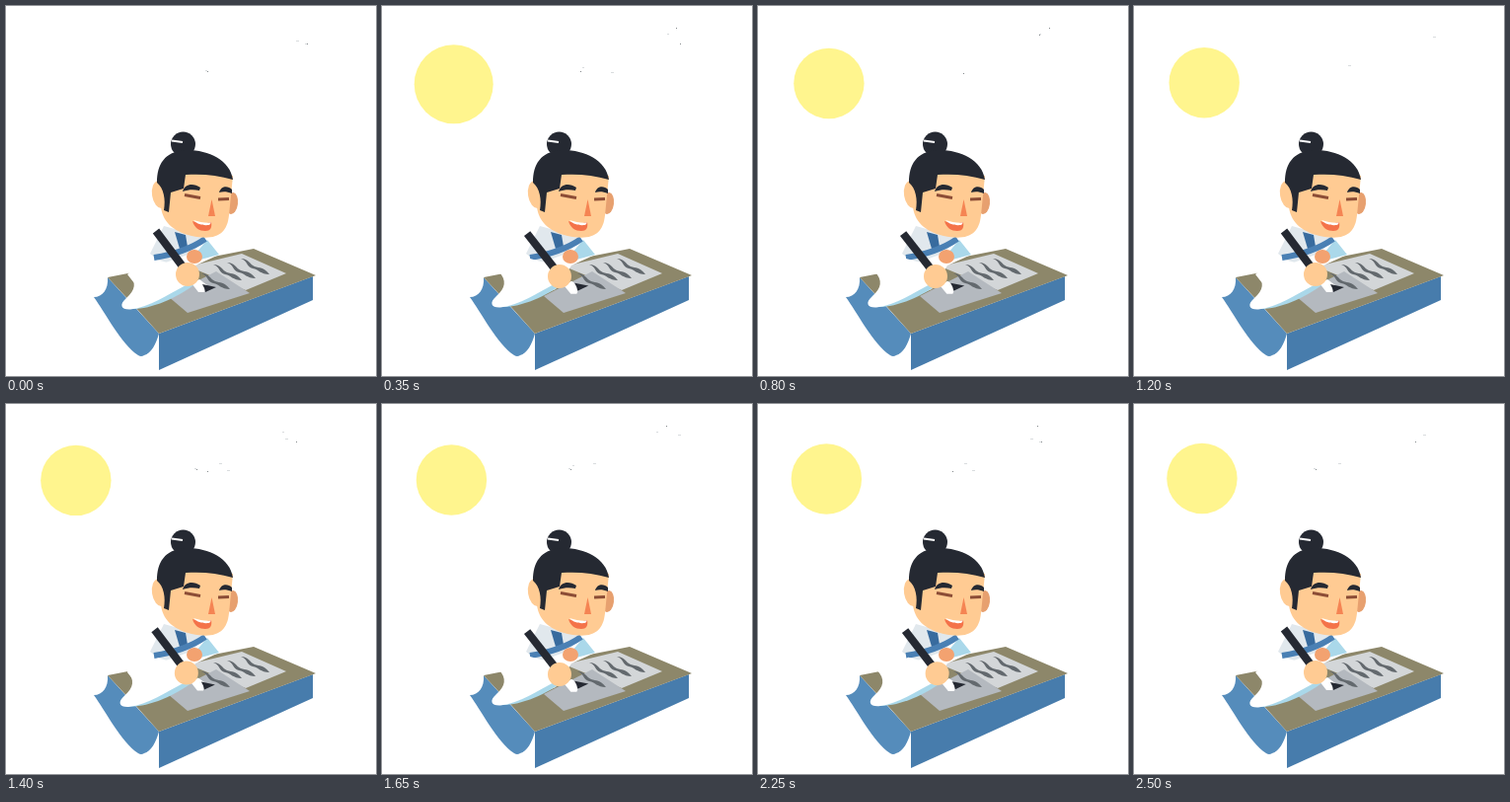
An HTML page with a canvas for the animation above (2550 ms loop, 375 px wide and 375 px high).

```html
<!DOCTYPE html>
<html lang="en">
<head>
<meta charset="utf-8">
<title>Calligrapher</title>
<style>
html, body { margin: 0; width: 100%; height: 100%; overflow: hidden; background: #fff; }
canvas { display: block; }
</style>
</head>
<body>
<canvas id="stage" width="375" height="375"></canvas>
<script>
const ctx = document.getElementById('stage').getContext('2d');
const LOOP = 2550, STEP = 50;
const SKIN = '#ffcb93', HAIR = '#252932', BLUE = '#4a80b4', PALE = '#aad8ea';

function fill(color, d) {
  ctx.fillStyle = color;
  ctx.fill(new Path2D(d));
}
function stroke(color, width, d) {
  ctx.strokeStyle = color;
  ctx.lineWidth = width;
  ctx.stroke(new Path2D(d));
}
function oval(color, x, y, rx, ry = rx, turn = 0) {
  ctx.fillStyle = color;
  ctx.beginPath();
  ctx.ellipse(x, y, rx, ry, turn, 0, 7);
  ctx.fill();
}
const clamp = v => Math.max(0, Math.min(1, v));
const smooth = v => { v = clamp(v); return v * v * (3 - 2 * v); };
const hash = n => { const v = Math.sin(n * 127.1) * 43758.5453; return v - Math.floor(v); };

function drawSun(t) {
  const grow = 40 * Math.sin(Math.PI / 2 * clamp(t / 0.35));
  const r = grow - 4.3 * smooth((t - 0.35) / 0.2);
  if (r > 0) oval('#fff58e', 73.3 - 1.75 * t, 79.8 - 1.7 * t, r);
}

// White clouds on white: only flickering flecks of their outlines show.
function drawClouds(t, tick) {
  [[302, 30, 11, 8], [222, 64, 20, 4]].forEach(([x, y, rx, ry], c) => {
    for (let i = 0; i < 7; i++) {
      const seed = c * 20 + i;
      if (hash(seed + tick * 3.7) < 0.62) continue;
      const a = hash(seed + 5) * 6.28;
      ctx.fillStyle = i % 3 ? '#d9dcde' : '#83888b';
      ctx.fillRect(Math.round(x - 8 * t + rx * Math.cos(a)), Math.round(y + ry * Math.sin(a)), 1 + i % 3, 1);
    }
  });
}

function drawTable() {
  fill('#558cbb', 'M103 275C104 287 98 295 89 295C100 310 117 343 134 354Q137 356 140 354C147 352 152 343 155 332Z');
  fill('#477cac', 'M155 332L311 274V298L155 369Z');
  fill('#8d876a', 'M103 275L251 246L314 273L155 332L129 303Z');
  fill('#d3d6d8', 'M185 264L239 251L284 271L243 288Z');
  fill('#b4b9bf', 'M164 294L213 269L247 291L184 311Z');
  const wave = 'c8 0 9 6 14 8s9 0 15 8c-9 0-11-5-17-6s-5-8-12-10z';
  for (const start of ['M210 262', 'M224 260', 'M238 256', 'M198 271'])
    fill('#63696e', start + wave);
}

function drawBody() {
  fill('#fff', 'M123 272L151 250L165 225L200 236L216 252L192 263L176 287L145 300Z');
  fill('#e1e8ed', 'M160 223L146 251L159 261L190 250L200 234Z');
  fill(PALE, 'M192 251L204 237L216 252L197 257Z');
  fill('#386b9e', 'M171 229L182 232L184 244L176 246Z');
  stroke(BLUE, 6, 'M150 255Q182 250 202 236');
  oval('#f3a270', 191, 254, 8, 7);
}

function drawHead() {
  oval('#e7a06f', 229, 200, 6, 11, 0.12);
  oval(SKIN, 156, 191, 8, 14, -0.15);
  fill(SKIN, 'M161 174L157 204C159 218 168 228 188 233C212 238 224 232 226 212L230 172L180 158Z');
  oval(HAIR, 179.5, 140, 12.5);
  stroke('#fff', 2.2, 'M168 136.5L179 138');
  fill(HAIR, 'M153 179C153 160 161 148 181 146C203 145 227 155 230 176C214 171 198 170 182 171L180 185L167 189L165 209L160 207C162 196 160 185 153 179Z');
  fill(HAIR, 'M179 188C181 180 190 179 197 184L196 187C190 186 185 186 179 188ZM216 189C218 182 225 182 229 186L229 190C224 188 220 188 216 189Z');
  stroke('#8c4d36', 3, 'M181 191.500L197 194.500M215 196L226 195.5');
  fill('#f58453', 'M208.500 196L205 213H212Z');
  fill('#f4734a', 'M189 218C196 221 202 221 208 219C209 225 207 228 202 228C196 228 191 225 189 218Z');
  fill('#fff', 'M190 217C196 219 202 220 208 219.500L206 222C200 222.500 195 222 190 217Z');
}

// k: 0 = hand forward, 1 = hand drawn back
function drawArm(k) {
  ctx.save();
  ctx.translate(-6 * k, -2 * k);
  fill(PALE, 'M126 307C145 308 172 297 193 281L172 268Z');
  fill('#fff', 'M124 271C133 280 131 288 122 296C114 303 117 308 126 307.500C146 305 163 293 184 282L178 264L156 258Z');
  ctx.restore();

  ctx.save();
  ctx.translate(-4 * k, 2 * k);
  ctx.translate(184, 272);
  ctx.rotate(-0.02 * k);
  ctx.translate(-184, -272);
  stroke(HAIR, 8, 'M152 228L182 268');
  fill('#fff', 'M188 281L196 277L204 283L201 290L195 290Z');
  oval(SKIN, 184, 272, 12);
  ctx.translate(0, -3 * k);
  fill(HAIR, 'M199 282L213 285L202 290L201 286Z');
  ctx.restore();
}

function draw(now) {
  const tick = Math.floor(now % LOOP / STEP);
  const t = tick * STEP / 1000;
  const phase = t % 1.275;
  const k = smooth(phase / 0.35) - smooth((phase - 0.8) / 0.4);
  ctx.clearRect(0, 0, 375, 375);
  drawSun(t);
  drawClouds(t, tick);
  drawTable();
  drawBody();
  drawHead();
  drawArm(k);
}

const start = performance.now();
function loop() {
  draw(performance.now() - start);
  requestAnimationFrame(loop);
}
loop();
</script>
</body>
</html>
```
